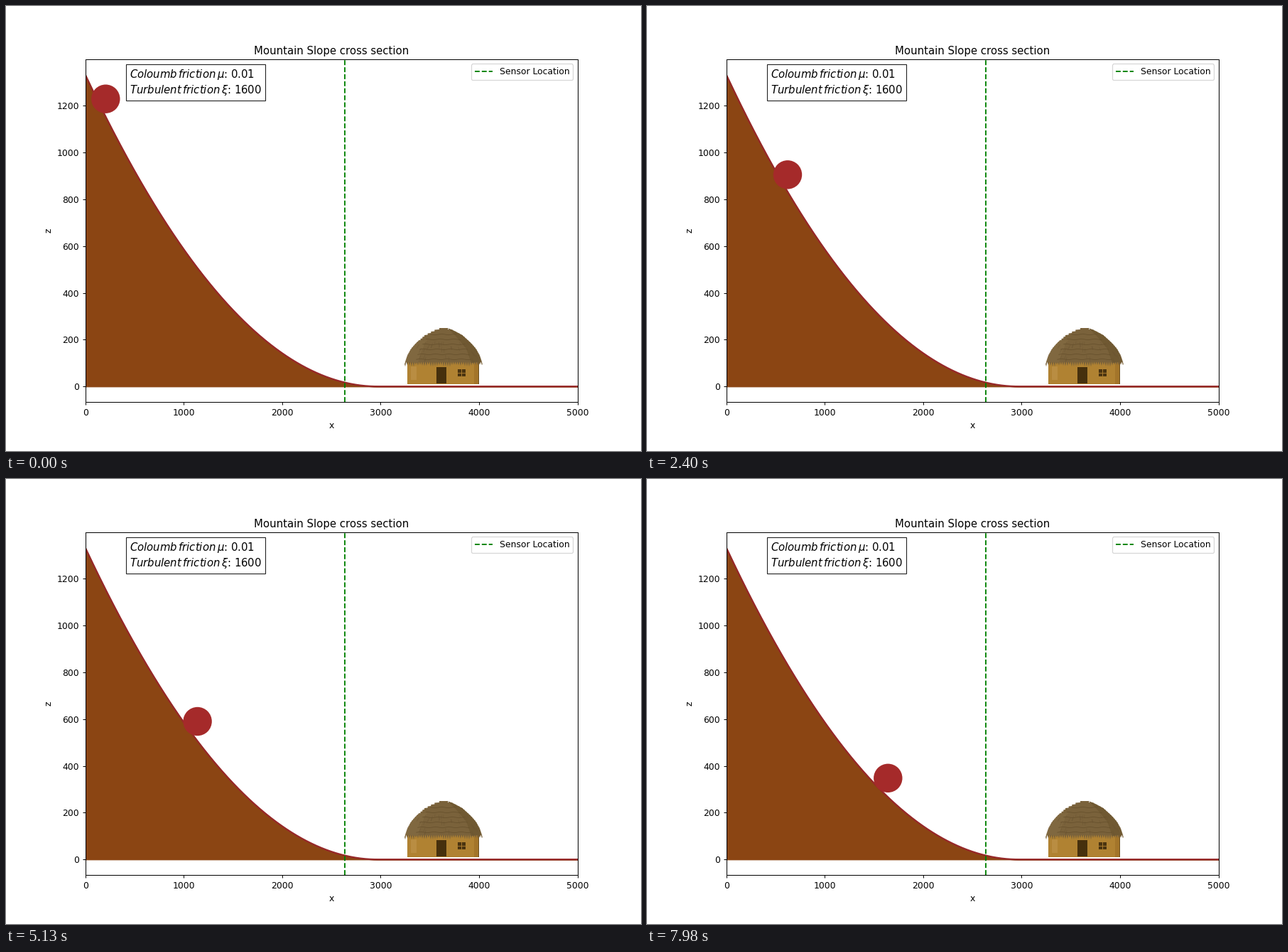
Animation of 894x626 px, one loop 8000 ms. Source, as a matplotlib script:

```python
import math
import random

import numpy as np
import matplotlib.pyplot as plt
from matplotlib.animation import FuncAnimation
from matplotlib.patches import Circle, Polygon, Rectangle
from matplotlib.transforms import Affine2D

W, H, DPI = 894, 626, 89.4
FRAMES, INTERVAL, STEP = 250, 32, 30
TOP, RUN = 1332, 2970

plt.rcParams["font.family"] = "DejaVu Sans"
fig, ax = plt.subplots(figsize=(W / DPI, (H + 0.005) / DPI), dpi=DPI)

# Pixel space with the origin at the top left
PX = Affine2D().scale(1, -1).translate(0, H)


def poly(points, color, z=4):
    ax.add_patch(Polygon(points, closed=True, fc=color, ec="none",
                         transform=PX, zorder=z))


def box(x0, y0, x1, y1, color, z=4):
    ax.add_patch(Rectangle((x0, y0), x1 - x0, y1 - y0, fc=color, ec="none",
                           transform=PX, zorder=z))


def stroke(xs, ys, color, width=0.7, z=5, alpha=1):
    ax.plot(xs, ys, color=color, lw=width, alpha=alpha, transform=PX, zorder=z)


def draw_plot():
    x = np.linspace(0, 5000, 1001)
    z = TOP * np.clip(1 - x / RUN, 0, None) ** 2
    ax.fill_between(x, z, color="#8b4513")
    ax.plot(x, z, color="#962828", lw=1.9)
    ax.axvline(2634, color="green", ls="--", label="Sensor Location")
    ax.set_xlim(0, 5000)
    ax.set_ylim(-0.05 * TOP, 1.05 * TOP)
    ax.set_title("Mountain Slope cross section")
    ax.set_xlabel("x")
    ax.set_ylabel("z")
    ax.legend(loc="upper right")


def draw_note():
    ax.add_patch(Rectangle((168.5, 81.5), 196, 51, fc="white", ec="#222222",
                           lw=0.9, transform=PX, zorder=3))
    lines = [r"$Coloumb\,friction\,\mu$: 0.01",
             r"$Turbulent\,friction\,\xi$: 1600"]
    for y, line in zip((101.4, 123), lines):
        ax.text(173.8, y, line, fontsize=12, va="baseline", transform=PX,
                zorder=4)


def roof_half(y):
    """Half width of the thatch at height y."""
    return np.interp(y, [453, 456, 463, 474, 482, 491, 503],
                     [6, 14, 27, 39, 46, 51, 55])


def draw_hut():
    rng = random.Random(4)
    mid = 616

    box(565, 498, 666, 532, "#b08232")
    box(570, 507, 578, 526, "#b98d42")
    box(659, 502, 665, 532, "#a3752a")
    box(665, 500, 666, 532, "#6b4c1c")
    box(565, 532, 666, 534, "white")
    box(606, 508, 619.5, 531, "#46300d")
    box(635.5, 510.5, 647, 521, "#4a3410")
    stroke([641.2, 641.2], [510.5, 521], "#a87a2e", 0.8)
    stroke([635.5, 647], [515.7, 515.7], "#a87a2e", 0.8)

    # Stepped dome with a ragged fringe
    heights = np.arange(453, 503, 2.5)
    left, right = [], []
    for y in heights:
        half = roof_half(y)
        left += [(mid - half, y), (mid - half, y + 2)]
        right += [(mid + half, y), (mid + half, y + 2)]
    fringe = []
    for i, x in enumerate(np.arange(670, 561, -1.5)):
        fringe.append((x, 500.5 if i % 2 else 504.5 + 3 * rng.random()))
    poly(left[::-1] + right + [(671, 503)] + fringe + [(561, 503)], "#7a623b")

    # Shade on the right, a lighter left flank
    shade = [(mid + roof_half(y) - 0.5, y) for y in heights]
    poly(shade + [(655, 502), (648, 482), (633, 464)], "#705932")
    flank = [(mid - roof_half(y) + 0.5, y) for y in heights if y > 470]
    poly(flank + [(580, 502), (585, 485), (593, 470)], "#806840")

    # Thatch layers and strands
    for y in (462, 469, 476, 483, 490, 497):
        half = roof_half(y) * 0.72
        xs = np.linspace(mid - half, mid + half, 24)
        ys = y + 0.6 * np.sin(xs * 0.33 + y)
        stroke(xs, ys, "#634d2a", 0.7, alpha=0.75)
    xs, ys = [], []
    for _ in range(34):
        a = rng.uniform(-0.95, 0.95)
        y = rng.uniform(472, 497)
        x = mid + a * roof_half(y)
        length = rng.uniform(3, 6)
        xs += [x, x + a * length * math.sin(0.8), np.nan]
        ys += [y, y + length, np.nan]
    stroke(xs, ys, "#665030", 0.5, alpha=0.5)


# Ball centre over time: ms, x, y
PATH = np.array([
    (0, 140.3, 130.7), (810, 161.5, 168), (1440, 175.8, 193.7),
    (1620, 180.5, 203.5), (2400, 198, 237.3), (3240, 220.5, 273),
    (3660, 231, 285.7), (4050, 243.5, 303), (4860, 262, 330.5),
    (5130, 269.6, 341), (5670, 282.5, 359), (6270, 298, 375.5),
    (6480, 303, 382), (7290, 322, 404), (7980, 339.3, 420.8),
])

draw_plot()
draw_note()
draw_hut()
ball = Circle(PATH[0, 1:], 20.2, fc="#a52a2a", ec="none", transform=PX,
              zorder=3)
ax.add_patch(ball)


def update(i):
    t = (i + 0.5) * INTERVAL // STEP * STEP
    ball.center = (np.interp(t, PATH[:, 0], PATH[:, 1]),
                   np.interp(t, PATH[:, 0], PATH[:, 2]))
    return [ball]


anim = FuncAnimation(fig, update, frames=FRAMES, interval=INTERVAL,
                     init_func=lambda: update(0), repeat=True, repeat_delay=0)
plt.show()
```
